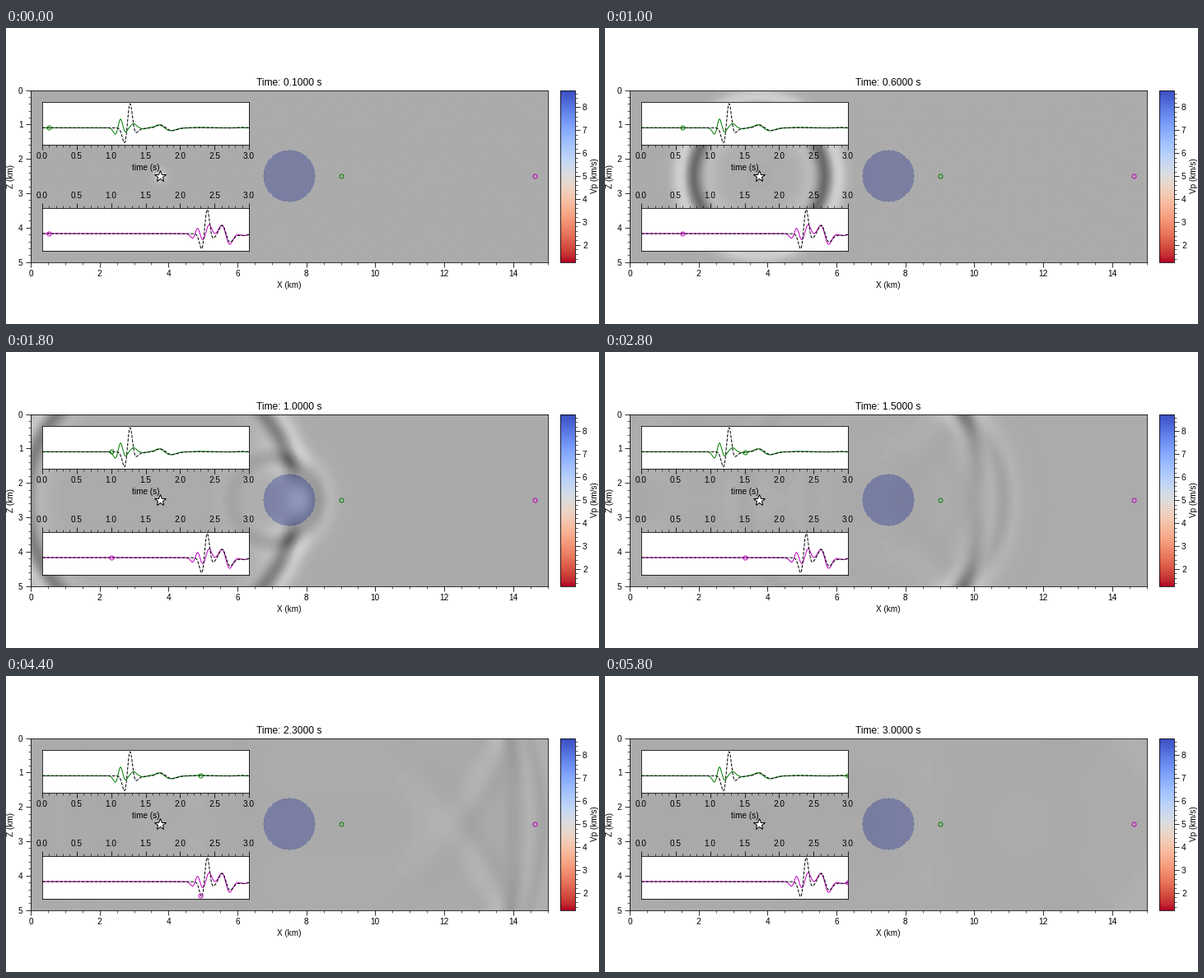
Write a matplotlib script that moves like this. It is 720 px wide and 360 px high and loops after 6000 ms.

```python
import numpy as np
import matplotlib.pyplot as plt
from matplotlib.animation import FuncAnimation
from matplotlib.ticker import MultipleLocator

W, H, DPI = 720, 360, 72
FRAMES, INTERVAL = 30, 200

# Model: 15 x 5 km with a fast disc, solved on the lower half (mirror symmetry in z)
LX, LZ, DX = 15.0, 5.0, 0.025
NX, NZ = 601, 101
PAD = 60
STEPS = 64                      # time steps per picture
DT = 0.1 / STEPS
FREQ, DELAY = 5.0, 0.2
V0, V1 = 5.0, 8.75
SRC, DISC, RADIUS = 3.75, 7.5, 0.75
RECEIVERS = [(9.02, "g"), (14.62, "m")]
MID = 2                         # row of the symmetry axis, below two ghost rows

plt.rcParams.update({
    "font.family": "Liberation Sans", "font.size": 10,
    "xtick.major.size": 6, "ytick.major.size": 6,
    "xtick.minor.size": 3, "ytick.minor.size": 3,
})


def velocity(x, z, v_disc):
    return np.where(np.hypot(x - DISC, z) <= RADIUS, v_disc, V0)


def column(x):
    return PAD + int(round(x / DX))


def simulate(v_disc):
    """Return pictures of the field and the receiver traces."""
    x = (np.arange(NX + 2 * PAD) - PAD) * DX
    z = (np.arange(NZ + PAD + MID) - MID) * DX
    gx, gz = np.meshgrid(x, z)
    c2 = ((velocity(gx, gz, v_disc) * DT / DX) ** 2).astype(np.float32)[2:-2, 2:-2]
    depth = np.maximum.reduce([-gx, gx - LX, gz - LZ / 2, 0 * gx]) / DX
    sponge = np.exp(-(0.004 * depth) ** 2).astype(np.float32)

    prev = np.zeros_like(sponge)
    u = np.zeros_like(sponge)
    cols = [column(r) for r, _ in RECEIVERS]
    snaps, traces = [], [u[MID, cols]]
    for k in range(FRAMES * STEPS):
        near = u[1:-3, 2:-2] + u[3:-1, 2:-2] + u[2:-2, 1:-3] + u[2:-2, 3:-1]
        far = u[:-4, 2:-2] + u[4:, 2:-2] + u[2:-2, :-4] + u[2:-2, 4:]
        core = u[2:-2, 2:-2]
        near *= 4 / 3
        far *= 1 / 12
        near -= far
        near -= 5 * core
        near *= c2
        prev[2:-2, 2:-2] = 2 * core - prev[2:-2, 2:-2] + near
        a = (np.pi * FREQ * (k * DT - DELAY)) ** 2
        prev[MID, column(SRC)] += (1 - 2 * a) * np.exp(-a)
        prev *= sponge
        u *= sponge
        prev[:MID] = prev[2 * MID:MID:-1]
        prev, u = u, prev
        traces.append(u[MID, cols])
        if (k + 1) % STEPS == 0:
            half = u[MID:MID + NZ, PAD:PAD + NX]
            snaps.append(np.vstack([half[:0:-1], half]))
    return snaps, np.array(traces)


snaps, disc_traces = simulate(V1)
_, plain_traces = simulate(V0)
vmax = snaps[6].max() / 0.56
times = np.arange(FRAMES * STEPS + 1) * DT

fig = plt.figure(figsize=(W / DPI, H / DPI), dpi=DPI, facecolor="white")


def add_axes(x, y, w, h):
    """Axes from a pixel box measured from the top left."""
    return fig.add_axes([x / W, 1 - (y + h) / H, w / W, h / H])


def ticks(axis, major, minor):
    axis.set_major_locator(MultipleLocator(major))
    axis.set_minor_locator(MultipleLocator(minor))


def ring(axes, x, y, color):
    return axes.plot([x], [y], "o", ms=5, mfc="none", mec=color, mew=1, zorder=5)[0]


ax = add_axes(30, 75.5, 627.5, 209.2)
extent = (0, LX, LZ, 0)
gx, gz = np.meshgrid(np.arange(NX) * DX, np.arange(1 - NZ, NZ) * DX)
model = ax.imshow(velocity(gx, gz, V1), cmap="coolwarm_r", vmin=1.25, vmax=8.75,
                  extent=extent, aspect="auto", interpolation="nearest")
field = ax.imshow(snaps[0], cmap="Greys", vmin=-vmax, vmax=vmax, alpha=0.7,
                  extent=extent, aspect="auto")
ax.plot([SRC], [LZ / 2], "*", ms=15, mfc="white", mec="black", mew=1)
for pos, color in RECEIVERS:
    ring(ax, pos, LZ / 2, color)
ax.set(xlim=(0, LX), ylim=(LZ, 0), xlabel="X (km)", ylabel="Z (km)")
ticks(ax.xaxis, 2, 0.5)
ticks(ax.yaxis, 1, 0.2)
title = ax.set_title("")

bar = fig.colorbar(model, cax=add_axes(672.5, 75.5, 18, 209.2), label="Vp (km/s)")
ticks(bar.ax.yaxis, 1, 0.2)

dots = []
for n, (_, color) in enumerate(RECEIVERS):
    box = add_axes(44, (89.7, 218.5)[n], 251, 52.3)
    box.plot(times, disc_traces[:, n], color=color, lw=1)
    box.plot(times, plain_traces[:, n], "k--", lw=1)
    box.set_xlim(0, 3)
    box.set_ylim(box.get_ylim())
    box.set_yticks([])
    ticks(box.xaxis, 0.5, 0.1)
    if n == 0:
        box.set_xlabel("time (s)")
    else:
        box.xaxis.tick_top()
    dots.append(ring(box, 0, 0, color))


def update(i):
    k = (i + 1) * STEPS
    title.set_text(f"Time: {times[k]:.4f} s")
    field.set_data(snaps[i])
    for n, dot in enumerate(dots):
        dot.set_data([times[k]], [plain_traces[k, n]])
    return [title, field, *dots]


anim = FuncAnimation(fig, update, frames=FRAMES, interval=INTERVAL,
                     repeat=True, repeat_delay=0, blit=False)
plt.show()
```
